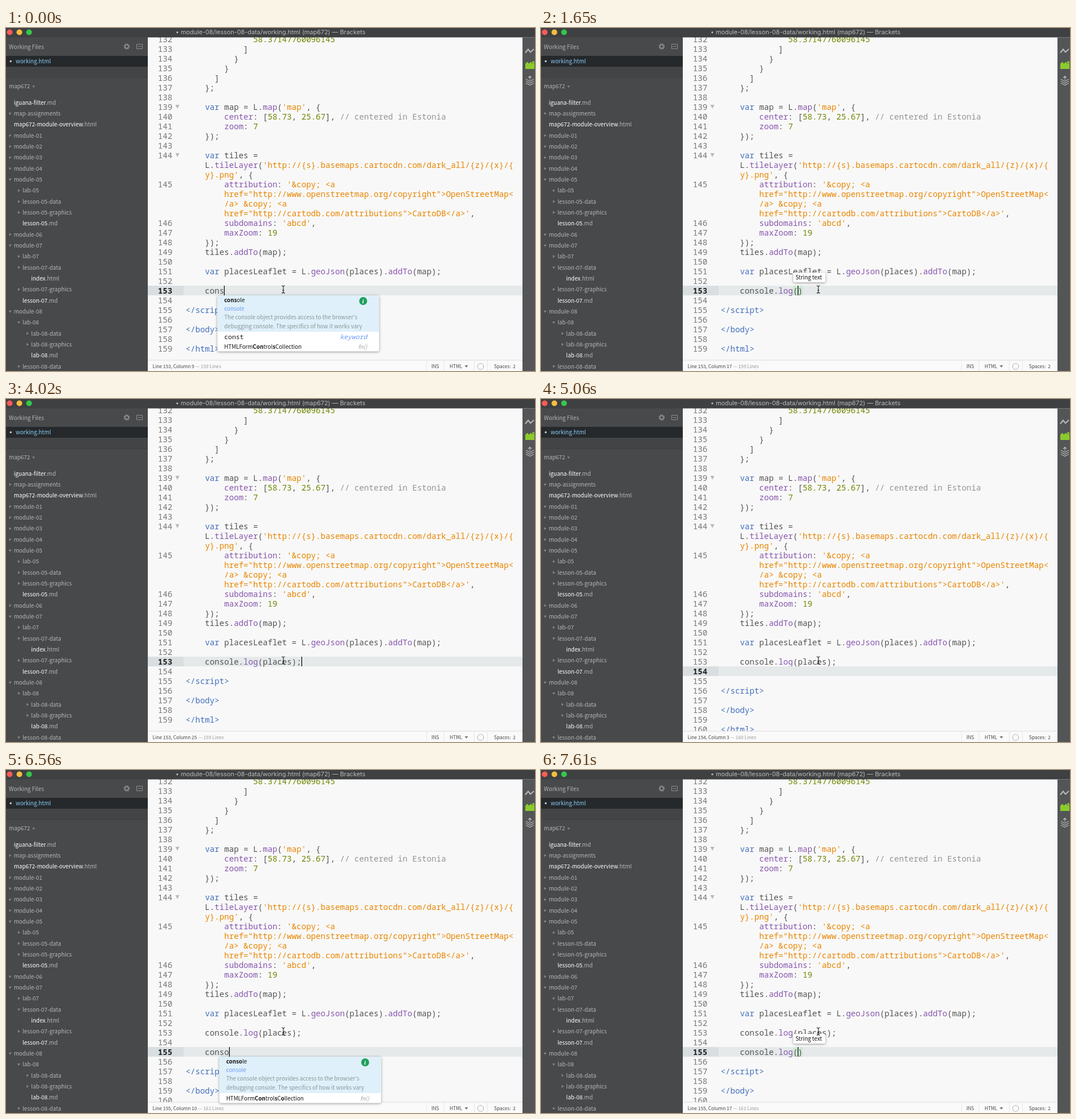
Write an HTML page that moves like this. It is 929 px wide and 603 px high and loops after 8 s.

```html
<!DOCTYPE html>
<html lang="en">
<head>
<meta charset="utf-8">
<title>Code editor</title>
<style>
html, body { margin: 0; width: 100%; height: 100%; overflow: hidden; background: #f8f8f8; }
svg { display: block; width: 929px; height: 603px; }
text { font: 9.9px 'Noto Sans CJK SC', 'Noto Sans CJK JP', 'Noto Sans', sans-serif; white-space: pre; }
text, tspan { fill: currentColor; }
.code { font: 500 14.117px 'Noto Sans Mono', 'Liberation Mono', monospace; color: #535353; }
.code.small { font-size: 11.4px; font-weight: 400; color: #111; }
.k { color: #446fbd; } .p { color: #8757ad; } .c { color: #949494; }
.s { color: #e88501; } .n { color: #6d8600; }
.code.num { color: #767676; }
.code.num.on { color: #222; font-weight: 600; }
.title { font: 10.85px Inter, 'Liberation Sans', sans-serif; color: #bcbcbc; text-anchor: middle; }
.dir { color: #b4b6b7; } .file { color: #fff; } .sel { color: #8bcdf2; }
.status { font-size: 8.3px; color: #454545; }
.count { color: #999; }
.hint { font-size: 9.75px; color: #111; }
.hint.olive { color: #436f0b; }
.hint.type { color: #6c9cf3; }
.hint.doc { color: #8b9499; }
.kind { text-anchor: end; font-style: italic; }
.code.small.kind { color: #6c9cf3; }
.hint.kind { color: #a0a0a0; }
.info { font: italic bold 11px 'Liberation Serif', serif; color: #fff; text-anchor: middle; }
.b { font-weight: bold; }
.shadow { filter: drop-shadow(0 1px 2px #0006); }
</style>
</head>
<body>
<svg viewBox="0 0 929 603">
  <rect width="929" height="603" fill="#f8f8f8"/>
  <g id="editor"></g>
  <g id="chrome"></g>
  <g id="overlay"></g>
</svg>
<script>
const CHAR = 8.47, LEFT = 315.5, ROW = 17, LOOP = 8000;
const byId = id => document.getElementById(id);

const text = (x, y, body, cls = '') => `<text x="${x}" y="${y}" class="${cls}">${body}</text>`;
const rect = (x, y, w, h, fill, more = '') => `<rect x="${x}" y="${y}" width="${w}" height="${h}" fill="${fill}" ${more}/>`;
const path = (d, fill, more = '') => `<path d="${d}" fill="${fill}" ${more}/>`;
const circle = (x, y, r, fill, more = '') => `<circle cx="${x}" cy="${y}" r="${r}" fill="${fill}" ${more}/>`;
const escape = s => s.replace(/&/g, '&amp;').replace(/</g, '&lt;');
const highlight = s => escape(s).replace(/~(.)(.*?)~/g, '<tspan class="$1">$2</tspan>');
const colX = col => LEFT + col * CHAR;

// ~x...~ colours a token, a leading ^ marks a wrapped row without a number.
const head = `              ~n58.37147760096145~
            ]
          }
        }
      ]
    };

    ~kvar~ map = L.~pmap~(~s'map'~, {
        ~pcenter~: [~n58.73~, ~n25.67~], ~c// centered in Estonia~
        ~pzoom~: ~n7~
    });

    ~kvar~ tiles =
^    L.~ptileLayer~(~s'http://{s}.basemaps.cartocdn.com/dark_all/{z}/{x}/{~
^    ~sy}.png'~, {
        ~pattribution~: ~s'&copy; <a~
^        ~shref="http://www.openstreetmap.org/copyright">OpenStreetMap<~
^        ~s/a> &copy; <a~
^        ~shref="http://cartodb.com/attributions">CartoDB</a>'~,
        ~psubdomains~: ~s'abcd'~,
        ~pmaxZoom~: ~n19~
    });
    tiles.~paddTo~(map);

    ~kvar~ placesLeaflet = L.~pgeoJson~(places).~paddTo~(map);
`.split('\n');
const tail = ['', '~k<\/script>~', '', '~k</body>~', '', '~k</html>~'];
const logged = '    console.~plog~(places);';

// time, line, text with caret (| shown, ! blinked off), popup
const steps = [
  [0, 153, '    cons|', 'global'],
  [150, 153, '    conso|', 'global'],
  [300, 153, '    consol|', 'global'],
  [450, 153, '    console|', 'global'],
  [600, 153, '    console.|', 'member'],
  [750, 153, '    console.l|', 'member'],
  [910, 153, '    console.lo|', 'member'],
  [1050, 153, '    console.log|', 'member'],
  [1500, 153, '    console.log(|)'],
  [1650, 153, '    console.log(|)', 'tip'],
  [2090, 153, '    console.log(p|)', 'place'],
  [2240, 153, '    console.log(pl|)', 'place'],
  [2390, 153, '    console.log(pla|)', 'place'],
  [2540, 153, '    console.log(plac|)', 'place'],
  [2690, 153, '    console.log(place|)', 'place'],
  [2830, 153, '    console.log(places|)', 'place'],
  [3280, 153, '    console.log(places!)', 'place'],
  [3580, 153, '    console.log(places)|'],
  [4020, 153, '    console.log(places);|'],
  [4460, 154, '  |'],
  [5060, 154, '  !'],
  [5210, 155, '  |'],
  [5510, 155, '    |'],
  [5960, 155, '    c|', 'global'],
  [6110, 155, '    co|', 'global'],
  [6410, 155, '    cons|', 'global'],
  [6560, 155, '    conso|', 'global'],
  [6710, 155, '    consol|', 'global'],
  [6860, 155, '    console|', 'global'],
  [7010, 155, '    console.|', 'member'],
  [7160, 155, '    console.l|', 'member'],
  [7310, 155, '    console.lo|', 'member'],
  [7460, 155, '    console.log|', 'member'],
  [7610, 155, '    console.log(|)', 'tip'],
];

function drawEditor(line, source, col, caretOn) {
  const typed = source.replace(/\.(\w+)/, '.~p$1~');
  const rows = [...head, ...{ 153: [typed], 154: [logged, typed], 155: [logged, '', typed] }[line], ...tail];
  let number = 131, out = '';
  rows.forEach((row, i) => {
    const mid = 20 + i * ROW, top = mid - 9, base = mid + 4.5, wrapped = row[0] === '^';
    if (!wrapped) number++;
    const active = number === line;
    if (active) {
      out += rect(249, top, 63, ROW, '#d9dfe1') + rect(312, top, 595, ROW, '#e5e9ea');
      const open = source.indexOf('('), close = source.indexOf(')');
      if (open > 0 && !source.includes(';'))
        for (const c of [open, close]) out += rect(colX(c), top, CHAR, ROW, '#cfe9d2', 'rx="1"');
    }
    if (!wrapped) out += text(266.8, base, number, 'code num' + (active ? ' on' : ''));
    out += text(LEFT, base, highlight(row.replace('^', '')), 'code');
    if (number === 139 || number === 144 && !wrapped) out += path(`M297.5 ${mid - 4}h7l-3.5 7z`, '#b9b9b9');
    if (active && caretOn) out += rect(Math.round(colX(col)) - .2, top, 1.2, ROW, '#000');
  });
  return out;
}

// Bold the characters of the query in order, as fuzzy matching does.
function emphasize(name, query) {
  let k = 0;
  return [...name].map(ch => ch.toLowerCase() === query[k] ? (k++, `<tspan class="b">${ch}</tspan>`) : ch).join('');
}

function hintsFor(kind, query) {
  const collection = ['HTMLFormControlsCollection', 'fn()'], keyword = 'keyword';
  if (kind === 'global') return {
    name: 'console', type: 'console', shift: query === 'conso' ? 17 : 12,
    docs: ["The console object provides access to the browser's", 'debugging console. The specifics of how it works vary'],
    items: query.length < 4 ? [['const', keyword], ['continue', keyword], ['confirm', 'fn()'], collection]
      : query.length === 4 ? [['const', keyword], collection] : [collection],
  };
  if (kind === 'place') return {
    name: 'places', type: 'places', shift: 4, docs: [], olive: true,
    items: [['placesLeaflet'], ...query === 'p' ? ['parent', 'parseFloat', 'parseInt', 'postMessage', 'print'].map(n => [n, 'fn()']) : []],
  };
  return query
    ? { name: 'log', type: 'fn(text: string)', shift: 6, docs: ['Outputs a message to the Web Console.'], items: [] }
    : { name: 'assert', type: 'fn(assertion: bool, text: string)', shift: 6, docs: ['Writes an error message to the console.'],
        items: [['count', 'fn()'], ['dir', 'fn()'], ['error', 'fn()']] };
}

function drawHints(kind, query, caretX, mid) {
  const { name, type, shift, docs, items, olive } = hintsFor(kind, query);
  const top = 31 + docs.length * 16.5, height = top + items.length * ROW;
  const x = caretX - shift, y = mid + 9 + height > 604 ? mid - 12 - height : mid + 9, tx = x + 12;
  let out = rect(x, y, 284, height + .5, '#fff', 'rx="3" class="shadow"') + rect(x, y, 284, top, '#dff0fa', 'rx="2"');
  out += text(tx, y + 11.7, emphasize(name, query), 'hint' + (olive ? ' olive' : ''));
  out += text(tx, y + 27, type, 'hint type');
  docs.forEach((doc, i) => out += text(tx, y + 42.2 + i * 15.4, doc, 'hint doc'));
  if (docs.length) out += circle(x + 256, y + 10, 7, '#20a05c') + text(x + 255.7, y + 13.6, 'i', 'info');
  items.forEach(([label, note], i) => {
    const base = y + top + 13 + i * ROW, font = note === 'keyword' ? 'code small' : 'hint';
    out += text(tx, base, font === 'hint' ? emphasize(label, query) : label, font + (olive && !note ? ' olive' : ''));
    if (note) out += text(x + 263, base, note, font + ' kind');
  });
  return out;
}

function drawStep([, line, marked, popup]) {
  const col = marked.search(/[|!]/), mid = 461 + (line - 153) * ROW;
  byId('editor').innerHTML = drawEditor(line, marked.replace(/[|!]/, ''), col, marked.includes('|'));
  let out = text(257.5, 598, `Line ${line}, Column ${col + 1}<tspan class="count"> — ${line + 6} Lines</tspan>`, 'status');
  if (popup === 'tip')
    out += rect(443, mid - 31, 56.5, 17, '#fff', 'rx="2.5" class="shadow"') + text(447, mid - 19, 'String text', 'hint');
  else if (popup)
    out += drawHints(popup, marked.slice(0, col).match(/\w*$/)[0], colX(col), mid);
  out += path('M484 453q3 0 3 2q0-2 3-2M487 455v9M484 466q3 0 3-2q0 2 3 2M485.5 461h3', 'none', 'stroke="#222" stroke-width="1.1"');
  byId('overlay').innerHTML = out;
}

// A leading > or v marks a closed or open folder, two spaces one level.
const tree = `iguana-filter.md
>map-assignments
map672-module-overview.html
>module-01
>module-02
>module-03
>module-04
vmodule-05
  >lab-05
  >lesson-05-data
  >lesson-05-graphics
  lesson-05.md
>module-06
vmodule-07
  >lab-07
  vlesson-07-data
    index.html
  >lesson-07-graphics
  lesson-07.md
vmodule-08
  vlab-08
    >lab-08-data
    >lab-08-graphics
    lab-08.md
  vlesson-08-data`.split('\n');

function drawTree() {
  return tree.map((entry, i) => {
    const [, pad, arrow, name, ext = ''] = entry.match(/^( *)(>|v(?=[ml]))?([^.]+)(\..*)?$/);
    const x = 13.7 + pad.length * 7.6, y = 131 + i * 19.33;
    const mark = arrow === '>' ? path(`M${x - 8} ${y - 2.5}l4 2.5l-4 2.5z`, '#85888a')
      : arrow ? path(`M${x - 9} ${y - 1.5}h5l-2.5 4z`, '#85888a') : '';
    return mark + text(x, y + 3.6, `${name}<tspan class="dir">${ext}</tspan>`, arrow ? 'dir' : 'file');
  }).join('');
}

function drawChrome() {
  const bar = '#47494b', icon = '#b4b6b7', dim = '#8c8e90';
  let out = rect(0, 0, 249, 603, bar) + rect(0, 0, 929, 16.5, '#3e4042') + rect(907, 16.5, 22, 587, '#535557');
  out += ['#fc5b57', '#f5bd3f', '#35c74b'].map((c, i) => circle(6.5 + i * 17, 7.5, 5, c)).join('');
  out += text(464.5, 11.2, '• module-08/lesson-08-data/working.html (map672) — Brackets', 'title');

  out += text(5, 36.6, 'Working Files', 'dir');
  out += circle(212, 32.5, 3.1, 'none', `stroke="${dim}" stroke-width="1.7"`)
    + circle(212, 32.5, 4.7, 'none', `stroke="${dim}" stroke-width="1.5" stroke-dasharray="1.85 1.84"`);
  out += path('M229.5 30v-1.5h10v1.5M229.5 35v1.5h10V35M229.5 30v5M239.5 30v5M231.5 32.5h6', 'none', `stroke="${dim}"`);
  out += rect(0, 49, 249, 19, '#25292c') + circle(8.3, 58.5, 1.7, '#cfd2d3') + text(17, 61.8, 'working.html', 'sel');
  out += rect(0, 68, 249, 19, '#424446') + rect(0, 87, 249, 1, '#3c3e40');
  out += text(5, 106, 'map672', 'dir') + path('M46 101.5h5l-2.5 3.5z', '#85888a') + drawTree();

  out += path('M912 43.5l5-6l4 5l6-5.5', 'none', `stroke="${icon}" stroke-width="2.2"`);
  out += path('M912 72v-10h2v-2h3v2h3v-2h3v2h5v10z', '#8ccb2c') + rect(924, 58.5, 4, 3, '#8ccb2c');
  out += path('M913 90l7 3.5l7-3.5M913 93.5l7 3.5l7-3.5M913 97l7 3.5l7-3.5M920 91v-6M917 87.5l3-3l3 3', 'none', `stroke="${icon}" stroke-width="1.2"`);

  out += rect(249, 584, 658, 19, '#fafafa') + rect(249, 583.5, 658, 1, '#dedede');
  out += [738, 768.5, 822, 845].map(x => rect(x, 584, 1, 19, '#e6e6e6')).join('');
  out += text(747, 598, 'INS', 'status') + text(779, 598, 'HTML', 'status') + text(857, 598, 'Spaces:  2', 'status');
  out += path('M805.5 593h6l-3 4z', '#777') + circle(833.5, 595, 5.3, 'none', 'stroke="#b0b0b0"');
  return out;
}

byId('chrome').innerHTML = drawChrome();
let shown;
function tick() {
  const t = performance.now() % LOOP;
  const step = steps.filter(s => s[0] <= t).pop();
  if (step !== shown) drawStep(shown = step);
  requestAnimationFrame(tick);
}
tick();
</script>
</body>
</html>
```
